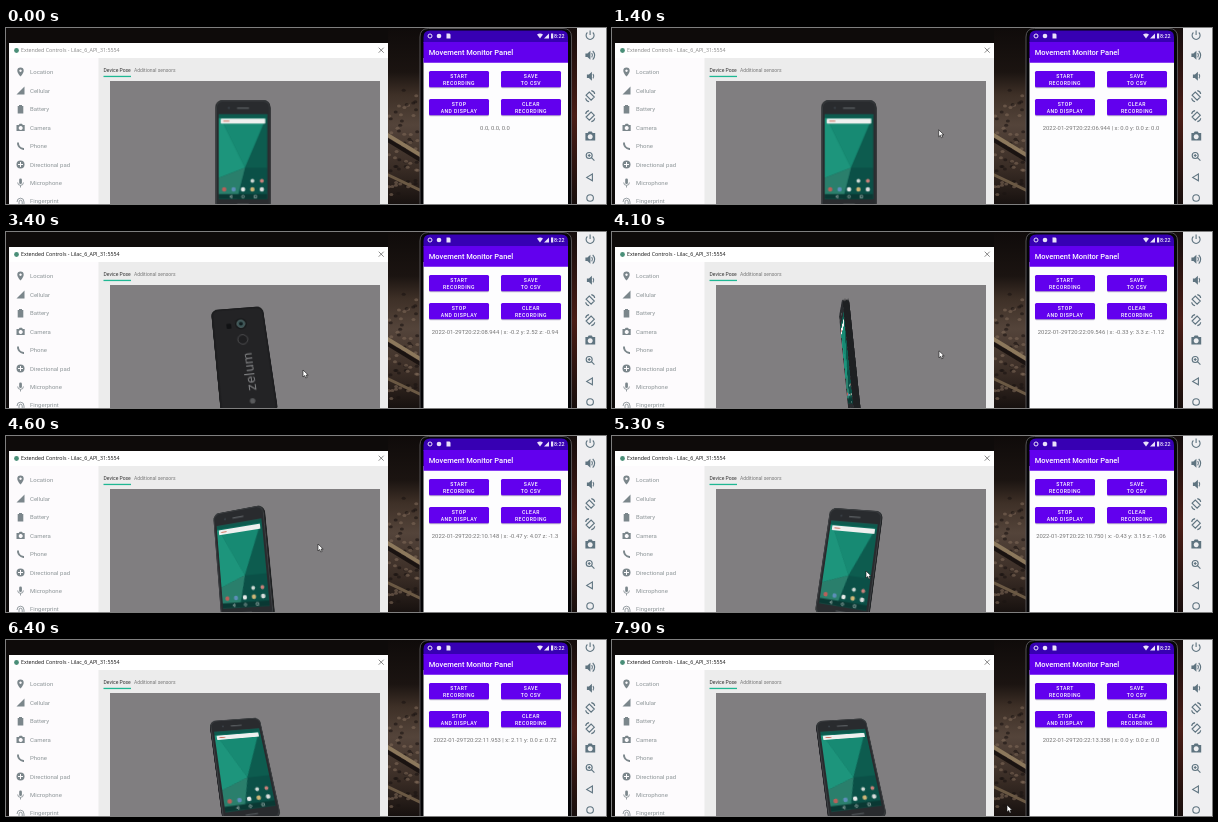
An HTML page for the animation above (8000 ms loop, 600 px wide and 176 px high).

```html
<!DOCTYPE html>
<html lang="en">
<head>
<meta charset="utf-8">
<title>Sensor emulator</title>
<style>
html, body { margin: 0; width: 100%; height: 100%; overflow: hidden; background: #0e0b0a; }
body { position: relative; font-family: Roboto, sans-serif; }
.stage { position: absolute; left: 0; top: 0; width: 600px; height: 176px; }
.view { position: absolute; left: 103.5px; top: 53px; width: 270.5px; height: 123px; overflow: hidden;
  background: #807e80; perspective: 260px; perspective-origin: 133.5px 74.5px; }
#phone { position: absolute; left: 106.5px; top: 20px; width: 54px; height: 109px; transform-style: preserve-3d; }
#phone > * { position: absolute; left: 0; top: 0; width: 54px; height: 109px; }
.layer { border-radius: 7px; background: #1e2022; }
.face { backface-visibility: hidden; }
.line { fill: none; stroke: #5f7480; stroke-width: 1.1; }
.solid { fill: #5f7480; }
.side { fill: #7b868b; }
.sideLine { fill: none; stroke: #7b868b; stroke-width: .8; }
.mid { text-anchor: middle; }
</style>
</head>
<body>
<svg class="stage" viewBox="0 0 600 176">
  <defs>
    <linearGradient id="photo" x2="0" y2="1">
      <stop offset="0" stop-color="#0f0b0a"/>
      <stop offset=".25" stop-color="#1b1411"/>
      <stop offset=".38" stop-color="#3e3027"/>
      <stop offset=".55" stop-color="#54443a"/>
      <stop offset=".8" stop-color="#392c25"/>
      <stop offset="1" stop-color="#17110f"/>
    </linearGradient>
    <linearGradient id="rim" x2="0" y2="1">
      <stop offset="0" stop-color="#140d0c"/>
      <stop offset=".5" stop-color="#4a1d16"/>
      <stop offset="1" stop-color="#180f0d"/>
    </linearGradient>
    <clipPath id="strip"><path d="M382 0h32v176h-32z"/></clipPath>
  </defs>

  <path fill="#0e0b0a" d="M0 0h600v176H0z"/>
  <g clip-path="url(#strip)">
    <path fill="url(#photo)" d="M382 0h32v176h-32z"/>
    <g id="beans"></g>
    <path d="M380 106l36 22" stroke="#8c785c" stroke-width="4"/>
    <path d="M380 111l36 22" stroke="#1a1311" stroke-width="4"/>
    <path d="M380 146l36 17" stroke="#6b5944" stroke-width="3"/>
  </g>
  <path fill="url(#rim)" d="M562 0h10v176h-10z"/>

  <!-- Controls window -->
  <path fill="#fff" d="M3 15h379v161H3z"/>
  <path fill="#fdfbfd" d="M3 30h90v146H3z"/>
  <path fill="#ececec" d="M92.500 30H382v146H92.500z"/>
  <circle cx="10.500" cy="22.500" r="2.400" fill="#4a8f78"/>
  <text id="title" x="15" y="24.400" font-size="5.300" style="font-family:'Open Sans',sans-serif">Extended Controls - Lilac_6_API_31:5554</text>
  <path d="M372.700 19.700l5 5m0-5l-5 5" fill="none" stroke="#555" stroke-width=".7"/>
  <g font-size="5">
    <text x="97.500" y="43.500" fill="#333">Device Pose</text>
    <text x="128" y="43.500" fill="#777">Additional sensors</text>
  </g>
  <path fill="#1fb793" d="M97.500 47.800H125v1.300H97.500z"/>
  <g id="menu" font-size="6" fill="#8d9598"></g>
  <path class="side" fill-rule="evenodd" d="M14.500 39.500a3.200 3.200 0 0 1 3.200 3.200q0 2.300-3.200 5.800-3.200-3.500-3.200-5.800a3.200 3.200 0 0 1 3.200-3.200zm0 2a1.200 1.200 0 1 0 .01 0z"/>
  <path class="side" d="M18.500 58.500v8h-8zM13 77h3v1h1.300v7.500h-5.600V78H13z"/>
  <path class="side" fill-rule="evenodd" d="M11 97h1.700l1-1.200h2.200l1 1.200h1.800v6H10.500v-6zm3.700 1a2 2 0 1 0 .01 0z"/>
  <path class="sideLine" d="M12 115q.2 5 5.500 6M12 114.500v2.300M15.800 121h2.200" style="stroke-width:1.800"/>
  <circle class="side" cx="14.500" cy="136.500" r="4"/>
  <path d="M14.500 134v5m-2.500-2.500h5" stroke="#fdfbfd" stroke-width="1"/>
  <rect class="side" x="13.200" y="150.500" width="2.700" height="5.500" rx="1.300"/>
  <path class="sideLine" d="M11.700 154.500a2.850 2.850 0 0 0 5.700 0M14.500 157.500v2M11 174a3.500 3.800 0 0 1 7 0v2M13 176v-2a1.600 1.800 0 0 1 3.200 0v2"/>

  <!-- Emulator -->
  <path fill="#050507" stroke="#5c5a5c" stroke-width=".9" d="M414 178V9q0-8.500 8.500-8.500h134.500q8.500 0 8.500 8.500v169z"/>
  <path fill="#fdfdfe" d="M417.500 30H562v146H417.500z"/>
  <path fill="#3700b3" d="M417.500 15V9q0-6.500 6.500-6.500h131.500q6.500 0 6.500 6.500v6z"/>
  <path fill="#6200ee" d="M417.500 14H562v20.700H417.500z"/>
  <g fill="#e9e2fa" transform="translate(0 -1)">
    <circle cx="424" cy="9" r="2" fill="none" stroke="#e9e2fa" stroke-width="1"/>
    <circle cx="433" cy="9" r="2.300"/>
    <path d="M440.500 6.500h3l1 1v4h-4zM531 7.500q3-2 6 0l-3 4zM543 6.500v5h-5zM545 6.500h2.200v5H545z"/>
    <text x="548" y="11.300" font-size="5.400" font-weight="500">8:22</text>
  </g>
  <text x="422.700" y="27" font-size="7.500" font-weight="500" fill="#fff">Movement Monitor Panel</text>
  <g id="buttons" class="mid" font-size="5.100" font-weight="500" letter-spacing=".46"></g>
  <text id="reading" class="mid" x="489" y="101.500" font-size="5.900" fill="#747474"></text>

  <!-- Toolbar -->
  <path fill="#efeff1" d="M571 0h29v176h-29z"/>
  <g transform="translate(-.6 0)">
    <path class="line" d="M582 4.500a4 4 0 1 0 5.400 0M584.700 2.500v4.500"/>
    <path class="solid" d="M580 25.500h2l3-2.800v9l-3-2.800h-2zM581.500 46.500h2l3-2.800v9l-3-2.800h-2z"/>
    <path class="line" d="M586.300 25q1.600 2.200 0 4.400M587.300 22.800q4 4.400 0 8.800M587.600 46q1.600 2.200 0 4.400"/>
    <path class="line" d="M580.700 67.200l3.200-3.200 5 5-3.200 3.200zM580.300 70.300q.4 3 3.400 3.400M589.300 66q-.4-3-3.400-3.400"/>
    <path class="line" d="M580.700 89l5-5 3.200 3.200-5 5zM580.300 86q.4-3 3.400-3.400M589.300 90.200q-.4 3-3.400 3.400"/>
    <path class="solid" fill-rule="evenodd" d="M580 105h2.300l1-1.500h3l1 1.500h2.500v7.500H580zm4.800 1.300a2.500 2.500 0 1 0 .01 0z"/>
    <circle class="line" cx="583.800" cy="127.500" r="3"/>
    <path class="line" d="M586 129.700l3 3M582.400 127.500h2.800M583.800 126.100v2.800"/>
    <path class="line" d="M587 146v6.800l-5.700-3.400z"/>
    <circle class="line" cx="584.700" cy="170" r="3.300"/>
  </g>
</svg>

<div class="view">
  <div id="phone">
    <svg class="face" id="front" viewBox="-27 -54.5 54 109">
      <clipPath id="screen"><path d="M-24-41h48v84h-48z"/></clipPath>
      <rect x="-27" y="-54.500" width="54" height="109" rx="7" fill="#3d4043"/>
      <rect x="-26" y="-53.500" width="52" height="107" rx="6.200" fill="#292b2e"/>
      <rect x="-6" y="-47.500" width="12" height="1.500" rx=".7" fill="#55595c"/>
      <circle cx="-14" cy="-47" r="1.100" fill="#3b4248"/>
      <rect x="-6" y="47.500" width="12" height="1.500" rx=".7" fill="#494d50"/>
      <g clip-path="url(#screen)">
        <path fill="#0f6657" d="M-24-41h48v84h-48z"/>
        <path fill="#178a73" d="M-24-41h48L2 12z"/>
        <path fill="#1d957c" d="M-24-41L2 12l-26 10z"/>
        <path fill="#0d5c4f" d="M24-38v50L2 12z"/>
        <path fill="#0b5047" d="M2 12h22v31H-6z"/>
        <path fill="#2a7f6c" d="M-24 22l26-10-8 31h-18z"/>
        <path fill="#0d5a4e" d="M-24-41h48v4h-48z"/>
        <rect x="-22" y="-36.500" width="44" height="5" rx=".7" fill="#eef0ef"/>
        <path d="M-19.500-34h6" stroke="#d0705f" stroke-width="1.200"/>
        <g id="apps"></g>
        <path fill="#0a3833" d="M-24 38h48v6h-48z"/>
        <path d="M-11 39.200l-2.200 1.400 2.200 1.400zM11 39.400h2.400v2.400H11z" fill="none" stroke="#dde4e2" stroke-width=".5"/>
        <circle cy="40.600" r="1.300" fill="none" stroke="#dde4e2" stroke-width=".5"/>
      </g>
    </svg>
    <svg class="face" id="back" viewBox="-27 -54.5 54 109">
      <rect x="-27" y="-54.500" width="54" height="109" rx="7" fill="#1d1d1f"/>
      <rect x="-25.500" y="-53" width="51" height="106" rx="6" fill="#232325"/>
      <rect x="-13" y="-38" width="5" height="5.500" rx="1.200" fill="#111214"/>
      <circle cx="2" cy="-37" r="6" fill="#161819"/>
      <circle cx="2" cy="-37" r="4.200" fill="#3c5556" stroke="#667474" stroke-width=".6"/>
      <circle cx="2" cy="-37" r="1.900" fill="#101c1e"/>
      <circle cx="2" cy="-20" r="5" fill="#1f1f21" stroke="#5a5a5c" stroke-width=".8"/>
      <text class="mid" transform="translate(8.500 13) rotate(-90)" font-size="13.500" letter-spacing=".5" fill="#808183">zelum</text>
      <circle cx="4" cy="42" r="2.600" fill="#58595b"/>
    </svg>
  </div>
</div>

<svg class="stage" viewBox="0 0 600 176">
  <path id="cursor" d="M0 0v7l1.700-1.500 1.100 2.500 1.300-.6L3 5h2.200z" fill="#fff" stroke="#111" stroke-width=".6"/>
</svg>
<script>
const LOOP = 8000, STEP = 100, ACTIVE_AT = 1900, RECORD_AT = 800;
const DEPTH = 6, LAYERS = 9;
const $ = id => document.getElementById(id);

// Each row: time, then the values reached at that time
const POSE = [ // yaw, pitch, roll in degrees
  [1900, 0, 0, 0], [2400, 38, 0, 8], [3400, 186, 14, -7], [4600, 341, 5, -5],
  [5300, 346, 4, 8], [6400, 371, 21, -10], [6700, 372, 22, -10]
];
const RATE = [ // x, y, z
  [1900, 0, 0, 0], [2400, .23, .96, -.08], [3400, -.2, 2.52, -.94], [4600, -.47, 4.07, -1.3],
  [5200, -.43, 3.15, -1.06], [5800, .64, 1.2, .15], [6400, 2.11, 0, .72], [6800, 0, 0, 0]
];
const POINTER = [
  [200, 474, 182], [600, 455, 53], [900, 455, 54], [1800, 224, 140], [2400, 230, 143],
  [3400, 297, 138], [4000, 330, 121], [4600, 312, 108], [5300, 254, 135], [5900, 228, 180],
  [7800, 228, 180], [7900, 395, 165]
];

function sample(keys, t) {
  if (t <= keys[0][0]) return keys[0].slice(1);
  const i = keys.findIndex(k => k[0] >= t);
  if (i < 0) return keys[keys.length - 1].slice(1);
  const a = keys[i - 1], b = keys[i], u = (t - a[0]) / (b[0] - a[0]);
  return a.slice(1).map((v, n) => v + (b[n + 1] - v) * u);
}

function build() {
  $('menu').innerHTML = ['Location', 'Cellular', 'Battery', 'Camera', 'Phone',
    'Directional pad', 'Microphone', 'Fingerprint']
    .map((s, i) => `<text x="24" y="${46.3 + i * 18.45}">${s}</text>`).join('');

  $('buttons').innerHTML = [['START', 'RECORDING'], ['SAVE', 'TO CSV'],
    ['STOP', 'AND DISPLAY'], ['CLEAR', 'RECORDING']].map(([a, b], i) => {
      const x = 423 + i % 2 * 72, y = 43 + (i >> 1) * 28;
      return `<rect x="${x}" y="${y + .8}" width="60" height="16.500" rx="1.500" fill="#bdb7c8"/>
        <rect x="${x}" y="${y}" width="60" height="16.300" rx="1.500" fill="#6200ee"/>
        <g fill="#fff"><text x="${x + 30}" y="${y + 7.3}">${a}</text>
        <text x="${x + 30}" y="${y + 13.6}">${b}</text></g>`;
    }).join('');

  $('apps').innerHTML = ['#b9605a', '#5c8fb8', '#e6eae8', '#cfb677', '#d9dcdb']
    .map((c, i) => `<circle cx="${(i - 2) * 9.3}" cy="33.500" r="2.200" fill="${c}"/>`).join('') +
    '<circle cx="9.300" cy="25" r="1.900" fill="#cfd8d4"/><circle cx="18.600" cy="25" r="1.900" fill="#c9807a"/>';

  let seed = 7;
  const rnd = () => (seed = seed * 16807 % 2147483647) / 2147483647;
  $('beans').innerHTML = Array.from({ length: 60 }, () =>
    `<ellipse cx="${383 + rnd() * 30}" cy="${62 + rnd() * 105}" rx="2" ry="1.500"
      fill="${rnd() < .5 ? '#7d6856' : '#1b1412'}" opacity=".6"/>`).join('');

  for (let i = 0; i < LAYERS; i++) {
    const layer = document.createElement('div');
    layer.className = 'layer';
    layer.style.transform = `translateZ(${(i / (LAYERS - 1) - .5) * DEPTH}px)`;
    $('phone').prepend(layer);
  }
  const lift = DEPTH / 2 + .2;
  $('front').style.transform = `translateZ(${lift}px)`;
  $('back').style.transform = `rotateY(180deg) translateZ(${lift}px)`;
}

function reading(t) {
  if (t < RECORD_AT) return '0.0, 0.0, 0.0';
  // A new reading arrives every 200 ms
  const tick = Math.floor(t / 200);
  const sec = 8.944 + (tick - 17) * (tick < 17 ? .2 : .20063);
  const num = v => {
    const n = Math.round(v * 100) / 100 || 0;
    return Number.isInteger(n) ? n + '.0' : String(n);
  };
  const [x, y, z] = sample(RATE, tick * 200).map(num);
  return `2022-01-29T20:22:${sec.toFixed(3).padStart(6, '0')} | x: ${x} y: ${y} z: ${z}`;
}

function draw(t) {
  const [yaw, pitch, roll] = sample(POSE, t);
  $('phone').style.transform = `rotateZ(${roll}deg) rotateX(${pitch}deg) rotateY(${yaw}deg)`;
  $('title').setAttribute('fill', t < ACTIVE_AT ? '#858585' : '#111');
  $('reading').textContent = reading(t);
  const [x, y] = sample(POINTER, t);
  $('cursor').setAttribute('transform', `translate(${x} ${y})`);
}

build();
const start = performance.now();
function loop() {
  const t = (performance.now() - start) % LOOP;
  draw(Math.floor(t / STEP) * STEP);
  requestAnimationFrame(loop);
}
loop();
</script>
</body>
</html>
```
